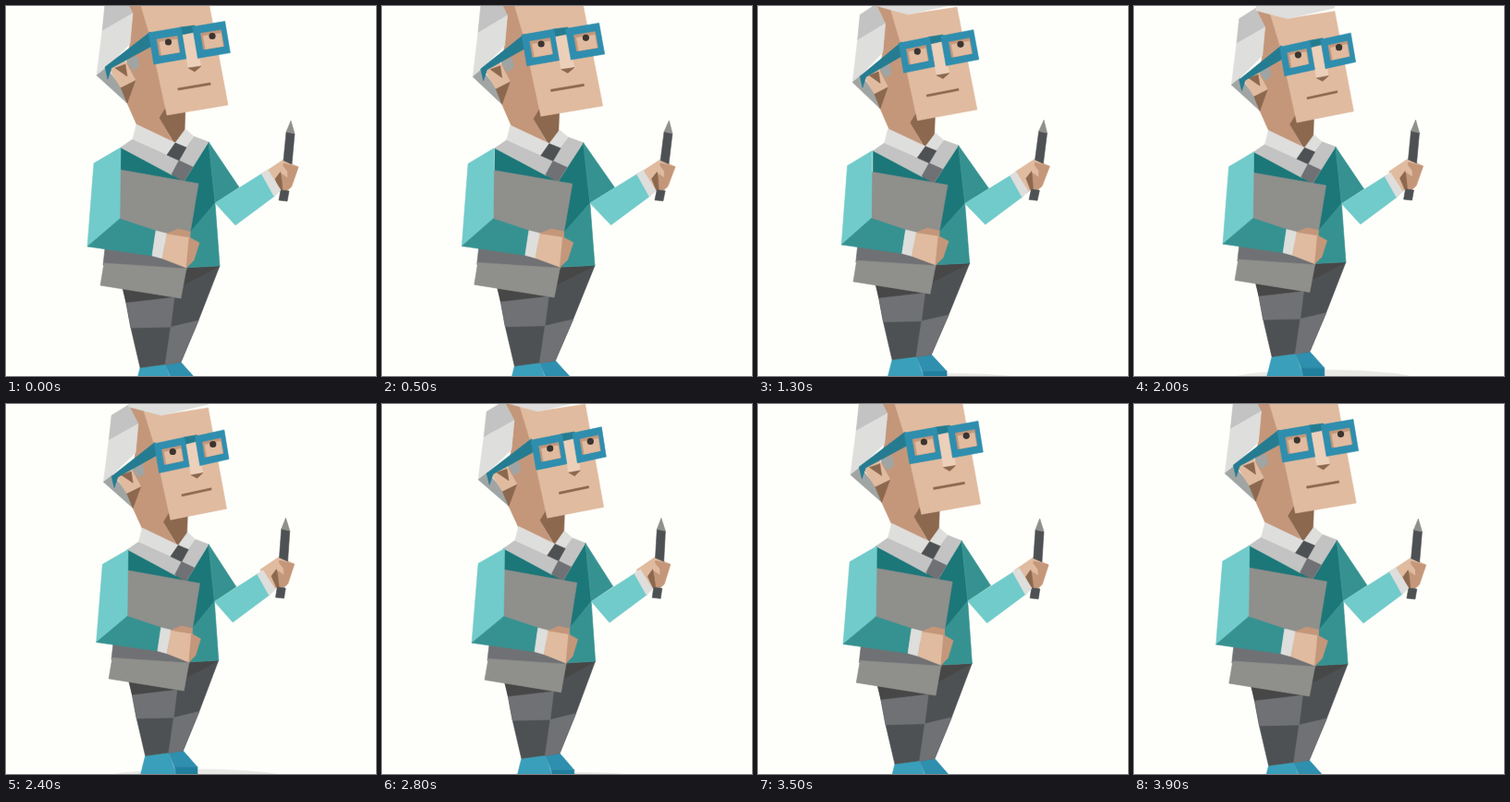
An HTML page with a canvas that plays this animation: 400 by 400 pixels, repeating every 4 s.

```html
<!DOCTYPE html>
<html lang="en">
<head>
<meta charset="utf-8">
<title>Man with book and pen</title>
<style>
html, body { margin: 0; width: 100%; height: 100%; overflow: hidden; background: #fefefa; }
canvas { display: block; width: 400px; height: 400px; }
</style>
</head>
<body>
<canvas id="stage" width="400" height="400"></canvas>
<script>
const ctx = document.getElementById('stage').getContext('2d');
const LOOP = 4000, STEP = 100;

const C = {
  paper: '#fefefa', shade: '#e9e9e6',
  skin: '#e0bb9f', skinMid: '#c4977a', skinDark: '#8c684f', skinLight: '#ecd0ba',
  white: '#dededc', silver: '#c2c3c2', steel: '#a0a5a4',
  blue: '#2f8eae', blueDark: '#257c90', shoe: '#3a9fba', shoeMid: '#2f8fae', shoeDark: '#217f9e',
  teal: '#1c7779', tealMid: '#369291', tealLight: '#71cbca',
  book: '#8f8f8c', grey: '#707174', dark: '#4d5153', darker: '#474747', ink: '#3b3431'
};

let rise = 0, swing = 0;

// The figure shrinks towards its middle and turns like a drum: points near the axis swing most.
function turning(turn, axis = 140, radius = 105, tilt = 0) {
  return (x, y) => {
    const near = Math.max(0, 1 - ((x - axis) / radius) ** 2);
    const zoom = .07 * rise;
    return [
      x - zoom * (x - 203) - turn * near * swing,
      y - zoom * (y - 222) + tilt * (198 - x) * rise
    ];
  };
}

const legs = turning(3.3);
const torso = turning(4);
const front = turning(5.3);
const skull = turning(3.5, 170, 90);
const cheek = turning(3.5, 170, 90, .03);
const face = turning(5.2, 170, 90, .045);
const hand = (x, y) => [x - 3.5 * rise + (.8 + .04 * (205 - y)) * swing, y - rise];

let place = legs;

function trace(points) {
  ctx.beginPath();
  for (let i = 0; i < points.length; i += 2) ctx.lineTo(...place(points[i], points[i + 1]));
}

function poly(color, ...points) {
  trace(points);
  ctx.closePath();
  ctx.fillStyle = ctx.strokeStyle = color;
  ctx.lineWidth = .6;
  ctx.lineJoin = 'round';
  ctx.fill();
  ctx.stroke();
}

// A box leaning with the face, around its centre.
function leaning(color, x, y, width, height) {
  const lean = .17, w = width / 2, h = height / 2;
  const corner = (i, j) => [x + i * w + j * h * lean, y + j * h - i * w * lean];
  poly(color, ...corner(-1, -1), ...corner(1, -1), ...corner(1, 1), ...corner(-1, 1));
}

function drawLegs() {
  place = legs;
  const [, floor] = place(205, 418);
  ctx.fillStyle = C.shade;
  ctx.beginPath();
  ctx.ellipse(205, floor, 102, 11, 0, 0, Math.PI * 2);
  ctx.fill();

  poly(C.shoe, 145, 391, 172, 387, 182, 415, 139, 415);
  poly(C.shoeMid, 172, 387, 189, 385, 206, 404, 179, 404);
  poly(C.shoeDark, 179, 404, 206, 404, 206, 415, 182, 415);
  poly(C.dark, 126, 300, 231, 281, 208, 340, 189, 385, 145, 391, 135, 348, 130, 321);
  poly(C.darker, 126, 305, 150, 285, 231, 281, 189, 303, 181, 316, 130, 321);
  poly(C.grey, 130, 321, 182, 315, 178, 347, 135, 348);
  poly(C.grey, 178, 347, 208, 340, 189, 385, 172, 388);
}

function drawLens(x, y) {
  leaning(C.blue, x, y, 35, 34);
  leaning(C.skinMid, x + 1, y, 22, 17.5);
  leaning(C.skin, x + 2, y + 1.5, 19, 14);
  ctx.beginPath();
  ctx.arc(...place(x + 1, y - 4), 3.6, 0, Math.PI * 2);
  ctx.fillStyle = C.ink;
  ctx.fill();
}

function drawHead() {
  place = skull;
  poly(C.skinMid, 126, -14, 163, -3, 160, 50, 176, 116, 166, 121, 183, 152, 143, 132,
    131, 105, 124, 86, 131, 60, 134, 40, 137, 8);
  poly(C.skinDark, 166, 121, 174, 108, 194, 108, 193, 136, 183, 150);
  poly(C.silver, 107, -2, 126, -14, 137, 8, 104, 27);
  poly(C.white, 104, 27, 137, 8, 134, 41, 108, 67, 98, 75);
  poly(C.steel, 98, 75, 108, 67, 124, 86, 131, 105);
  poly(C.steel, 130, 59, 142, 54, 144, 65, 137, 70);
  poly(C.skinDark, 124, 88, 140, 80, 131, 105);
  poly(C.skin, 112, 69, 128, 58, 140, 80, 124, 88);
  poly(C.skinDark, 118, 67, 129, 63, 131, 76);

  place = cheek;
  poly(C.skin, 143, -10, 163, -3, 218, -10, 240, 107, 174, 118, 155, 30);
  poly(C.white, 126, -14, 163, -3, 218, -14, 215, -30, 130, -30);
  poly(C.blueDark, 107, 66, 156, 28, 160, 42, 114, 67, 110, 79);

  place = face;
  poly(C.skinLight, 190, 29, 204, 28, 211, 66, 197, 67);
  poly(C.skinDark, 197, 67, 211, 65, 204, 71);
  poly(C.blueDark, 188, 23, 204, 21, 205, 28, 190, 31);
  drawLens(174.5, 43);
  drawLens(222, 36.5);
  leaning(C.skinDark, 203.5, 87, 35, 2.2);
}

function drawTorso() {
  place = torso;
  poly(C.teal, 124, 153, 192, 188, 219, 147, 226, 213, 196, 249, 123, 235);
  poly(C.tealMid, 226, 213, 231, 281, 190, 283, 160, 265, 196, 248);

  poly(C.silver, 124, 153, 137, 144, 175, 161, 187, 167, 180, 183);
  poly(C.white, 141, 128, 183, 148, 175, 161, 137, 144);
  poly(C.silver, 203, 141, 219, 147, 192, 190, 187, 167, 194, 153);
  poly(C.white, 194, 133, 203, 141, 194, 153, 183, 148);
  poly(C.dark, 183, 148, 195, 153, 187, 167, 174, 161);
  poly(C.grey, 187, 167, 202, 174, 192, 190, 179, 182);
}

function drawRightArm() {
  place = hand;
  poly(C.skin, 279, 180, 300, 166, 316, 174, 309, 195, 297, 199, 292, 203);
  poly(C.skinMid, 300, 170, 316, 174, 308, 196, 301, 202, 296, 199);
  poly(C.skinDark, 291, 187, 297, 179, 299, 199, 296, 199);
  poly(C.skin, 297, 170, 304, 179, 304, 185, 297, 180);
  poly(C.dark, 303, 136, 312, 138, 309, 171, 300, 167);
  poly(C.book, 308, 124, 312, 138, 303, 136);
  poly(C.dark, 297, 199, 306, 200, 304, 211, 295, 210);

  place = torso;
  poly(C.tealMid, 219, 147, 252, 196, 226, 213);
  poly(C.tealLight, 226, 213, 277, 181, 291, 205, 248, 237);
  poly(C.white, 276, 181, 283, 177, 297, 199, 290, 206);
}

function drawBook() {
  place = front;
  poly(C.grey, 107, 262, 160, 268, 197, 282, 195, 285, 105, 280);
  poly(C.book, 106, 278, 195, 284, 189, 316, 102, 302);
  poly(C.book, 123, 177, 208, 192, 198, 252, 160, 246, 123, 234);
}

function drawLeftArm() {
  place = front;
  poly(C.tealLight, 95, 170, 124, 153, 123, 230, 88, 260);
  poly(C.tealMid, 88, 260, 123, 230, 162, 243, 158, 270);
  poly(C.white, 162, 243, 174, 246, 169, 273, 158, 270);
  poly(C.skin, 174, 246, 199, 250, 195, 283, 169, 273);
  poly(C.skinMid, 174, 246, 186, 241, 199, 244, 199, 250);
  poly(C.skinMid, 198, 250, 209, 256, 203, 275, 195, 283);
}

function draw(time) {
  const phase = 2 * Math.PI * time / LOOP;
  rise = (1 - Math.cos(phase)) / 2;
  swing = Math.sin(phase);
  ctx.fillStyle = C.paper;
  ctx.fillRect(0, 0, 400, 400);
  drawLegs();
  drawHead();
  drawTorso();
  drawRightArm();
  drawBook();
  drawLeftArm();
}

const start = performance.now();
function tick() {
  const elapsed = (performance.now() - start) % LOOP;
  draw(Math.floor(elapsed / STEP) * STEP);
  requestAnimationFrame(tick);
}
tick();
</script>
</body>
</html>
```
